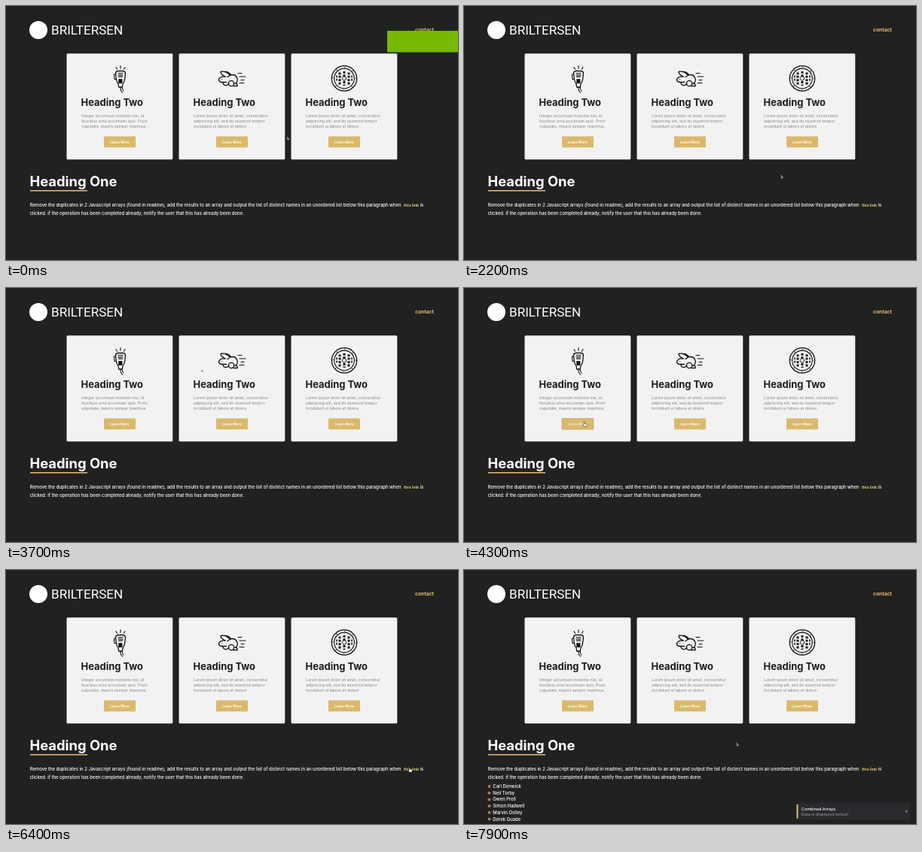
Write an HTML page that moves like this. It is 600 px wide and 338 px high and loops after 8000 ms.

```html
<!DOCTYPE html>
<html lang="en">
<head>
<meta charset="utf-8">
<title>Landing page</title>
<style>
html, body { margin: 0; width: 100%; height: 100%; overflow: hidden; background: #212121; }
svg { display: block; width: 600px; height: 338px; font-family: Inter, sans-serif; font-size: 5.93px; font-weight: 500; fill: #fff; }
.bold { font-weight: 700; }
.gold { fill: #e6bf6e; }
.line { fill: none; stroke: #111; stroke-width: 1.3; stroke-linecap: round; stroke-linejoin: round; }
.copy { font-size: 5.2px; font-weight: 400; fill: #858585; }
.button rect { fill: #dab96b; }
.button text { font-size: 4.65px; font-weight: 600; text-anchor: middle; }
.hover rect { stroke: #8f7a48; stroke-width: .6; stroke-dasharray: 1 1; }
.hover text { opacity: .75; }
</style>
</head>
<body>
<svg viewBox="0 0 600 338">
  <circle cx="43" cy="32" r="12"/>
  <text x="60" y="37.6" font-size="17.1" font-weight="400" style="font-family:Roboto,sans-serif">BRILTERSEN</text>
  <text class="bold gold" x="543" y="33.8" font-size="6.7">contact</text>
  <g id="cards"></g>

  <!-- radio microphone -->
  <g class="line">
    <path d="M146 81.5l1.6 2.7M152 79.5v3.7M158 81.5l-1.6 2.7" stroke-width="1.1"/>
    <path d="M148.5 86.5h7q3 .3 3 3.500l-1 8q-.4 3-2.500 5.500l-.7 4.500h-4.600l-.7-4.500q-2.100-2.500-2.500-5.500l-1-8q0-3.200 3-3.500z"/>
    <path d="M149 89.500h6M149 91.800h6M149.500 94.100h5" stroke-width="1.2"/>
    <path d="M145 91h-1.600l.6 6.500h1.800" stroke-width="1.1"/>
    <path d="M150 97.500h4v5h-4z" fill="#111" stroke-width=".8"/>
    <path d="M152 108v2.500q.2 2.500 2.500 4.500M154 108q.3 3 2 5" stroke-width="1.1"/>
  </g>

  <!-- running rabbit -->
  <g class="line">
    <path d="M291 94q-6-3-6-6.500q7-1.500 12 4.500M290 87.500q5-.5 8.500 4"/>
    <path d="M291 94q-6-1-8.500 3.500q-.3 3.500 4 4h6"/>
    <path d="M297 92q8-2 10 4.500q1 4-2 6.500M297 92q-1 2-3 2.500"/>
    <path d="M288 101.500q0 4.500 5 4l3-2M302 106.500h5q1-3.500-3-3.500"/>
    <circle cx="299" cy="103" r="3.700"/>
    <circle cx="286.500" cy="97.500" r=".6" fill="#111" stroke="none"/>
    <path d="M308 89.500h5M310 94h8M312 98.500h4M310 102.500h6" stroke-width="1.1"/>
  </g>

  <!-- manhole cover -->
  <g class="line" transform="translate(449 96.400)">
    <circle r="16.700"/>
    <circle r="13.300" stroke-width="1.100"/>
    <circle r="15" stroke-width="1.700" stroke-dasharray=".8 10.980" stroke-linecap="butt"/>
    <path d="M-6-8v16M0-9.500v19M6-8v16" stroke-width="3" stroke-linecap="butt" stroke-dasharray="2.800 1.600"/>
    <path d="M-10-4v8M10-4v8" stroke-width="1.600" stroke-linecap="butt" stroke-dasharray="2.800 1.600"/>
    <circle r="2.700" fill="#f2f2f2" stroke-width=".9"/>
  </g>

  <text class="bold" x="31.400" y="239.500" font-size="18.400">Heading One</text>
  <rect class="gold" x="32" y="245" width="76" height="1.500"/>
  <text x="31.700" y="267">Remove the duplicates in 2 Javascript arrays (found in readme), add the results to an array and output the list of distinct names in an unordered list below this paragraph when</text>
  <text class="bold gold" x="528" y="267" font-size="5.300">this link</text>
  <text x="549.500" y="267">is</text>
  <text x="31.700" y="277.500">clicked. if the operation has been completed already, notify the user that this has already been done.</text>

  <g id="list"></g>
  <g id="toast">
    <rect x="441.500" y="310" width="150.500" height="22" rx="1" fill="#292a2d"/>
    <rect class="gold" x="441.500" y="312" width="2" height="18.500"/>
    <text x="448" y="319.600" font-size="5.400">Combined Arrays.</text>
    <text x="448" y="327.200" font-size="5.400" fill="#8b8b8b">Data is displayed below!</text>
    <path d="M585.700 319.700l3 3m0-3l-3 3" stroke="#ccc" stroke-width=".6"/>
  </g>

  <rect id="block" x="506" y="33" width="94" height="28.500" fill="#76b900"/>
  <g id="cursor">
    <path id="arrow" fill="#111" stroke="#fff" stroke-width=".5" d="M0 0v3.300l.8-.7.6 1.300.6-.3-.6-1.200h1.100z"/>
    <path id="hand" stroke="#111" stroke-width=".5" d="M-.8-1q.7-.5 1 0v2l2.400.6q.7.300.5 1.300l-.6 2.100h-3l-1.700-2.300q0-.8 1.400 0z"/>
    <path id="beam" fill="none" stroke="#666" stroke-width=".5" d="M-.8-2.500h1.600M0-2.500v5M-.8 2.500h1.600"/>
  </g>
</svg>
<script>
const $ = id => document.getElementById(id);
const lorem = ['Lorem ipsum dolor sit amet, consectetur', 'adipiscing elit, sed do eiusmod tempor', 'incididunt ut labore et dolore'];
const integer = ['Integer accumsan molestie nisi, id', 'faucibus urna accumsan quis. Proin', 'vulputate, mauris semper maximus.'];
const cardX = [81, 230, 379];

$('cards').innerHTML = cardX.map((x, i) => `
  <rect x="${x - .5}" y="63.3" width="140.8" height="141" rx="1.5" fill="#f2f2f2"/>
  <text class="bold" x="${x + 18.5}" y="132.5" font-size="12.95" fill="#1c1c1c">Heading Two</text>
  ${(i ? lorem : integer).map((s, n) => `<text class="copy" x="${x + 19}" y="${147.5 + n * 7.45}">${s}</text>`).join('')}
  <g class="button"><rect x="${x + 49}" y="173.5" width="42" height="14.7" rx=".8"/>
  <text x="${x + 70}" y="182.6">Learn More</text></g>`).join('');
const buttons = document.querySelectorAll('.button');

$('list').innerHTML = ['Carl Denwick', 'Neil Torby', 'Owen Prell', 'Simon Hadwell', 'Marvin Ostley', 'Derek Quade']
  .map((name, i) => {
    const y = 288 + i * 8.7;
    return `<circle cx="33.5" cy="${y}" r="2" fill="#a67c58"/><text x="38.3" y="${y + 2}">${name}</text>`;
  }).join('');

// time, x, y
const path = [
  [0, 373.5, 174.5], [1300, 373.5, 174.5], [1600, 360, 188], [2200, 421, 225.5],
  [2600, 450, 181], [2800, 450, 176], [3100, 434, 131], [3500, 300, 181],
  [3750, 255, 100], [4000, 206, 122], [4300, 160, 179.5], [4900, 155, 180],
  [5200, 181.5, 231], [5500, 280, 266], [5800, 424, 262], [6300, 536, 264],
  [6600, 536, 264], [7000, 540, 268], [7600, 553, 311], [7900, 362, 230.3]
];
const clamp = v => Math.max(0, Math.min(1, v));
const smooth = v => v * v * (3 - 2 * v);
const inside = (x, y, l, t, r, b) => x >= l && x <= r && y >= t && y <= b;

function pointer(t) {
  const i = Math.max(1, path.findIndex(p => p[0] >= t));
  const [t0, x0, y0] = path[i - 1], [t1, x1, y1] = path[i];
  const k = smooth(clamp((t - t0) / (t1 - t0)));
  return [x0 + (x1 - x0) * k, y0 + (y1 - y0) * k];
}

function draw(t) {
  const [x, y] = pointer(t);
  let shape = 'arrow';
  if (inside(x, y, 32, 260, 554, 279)) shape = 'beam';
  if (inside(x, y, 528, 261, 548, 269)) shape = 'hand';
  cardX.forEach((cx, i) => {
    if (inside(x, y, cx + 19, 122, cx + 101, 135) || inside(x, y, cx + 19, 142, cx + 119, 164)) shape = 'beam';
    const over = inside(x, y, cx + 49, 173, cx + 91, 189);
    if (over) shape = 'hand';
    buttons[i].classList.toggle('hover', over);
  });
  for (const id of ['arrow', 'hand', 'beam']) $(id).style.display = id === shape ? '' : 'none';
  $('cursor').setAttribute('transform', `translate(${x} ${y})`);

  $('block').style.display = t < 100 ? '' : 'none';
  $('list').style.display = t >= 6500 ? '' : 'none';
  const shown = smooth(clamp((t - 6400) / 400));
  $('toast').setAttribute('opacity', shown);
  $('toast').setAttribute('transform', `translate(0 ${(1 - shown) * 10})`);
}

const start = performance.now();
function tick() {
  const t = (performance.now() - start) % 8000;
  draw(Math.floor(t / 100) * 100);
  requestAnimationFrame(tick);
}
tick();
</script>
</body>
</html>
```
